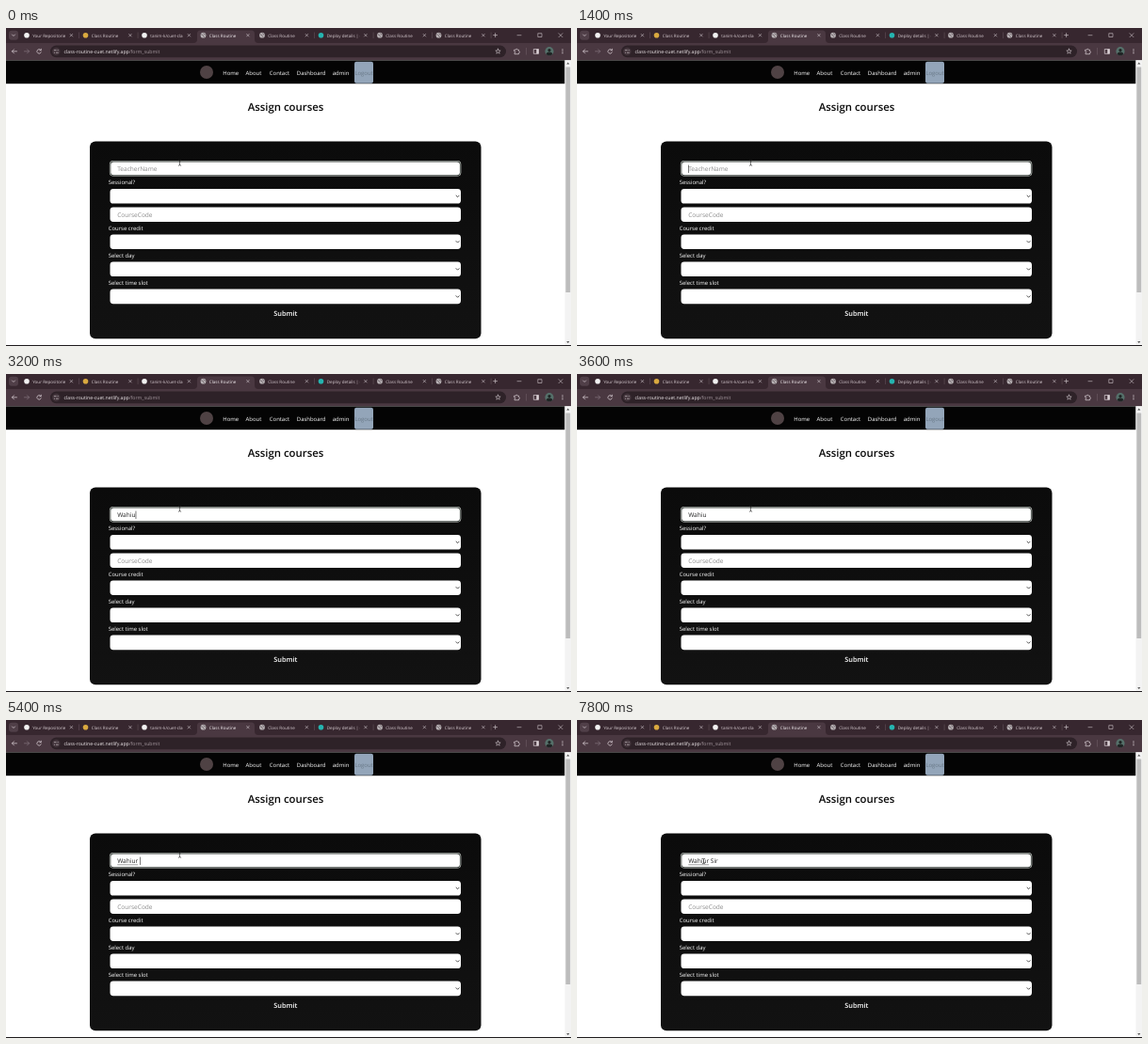
These frames come from a looping animation (600 by 338 pixels, 8 s). An HTML page:

```html
<!DOCTYPE html>
<html lang="en">
<head>
<meta charset="utf-8">
<title>Assign courses</title>
<style>
  html, body { margin: 0; width: 100%; height: 100%; overflow: hidden; background: #fff; }
  svg { display: block; width: 100vw; height: 100vh; }
  text { font-family: "Open Sans", "Noto Sans", sans-serif; white-space: pre; text-rendering: geometricPrecision; }
</style>
</head>
<body>
<svg id="stage" viewBox="0 0 600 338">
  <defs>
    <linearGradient id="panel" x1="0" y1="0" x2="0" y2="1">
      <stop offset="0" stop-color="#0b0b0b"/><stop offset="1" stop-color="#121212"/>
    </linearGradient>
    <clipPath id="face"><circle cx="577" cy="24.7" r="4.6"/></clipPath>
  </defs>
  <g id="browser"></g>
  <g id="page"></g>
  <g id="live"></g>
</svg>
<script>
const NS = 'http://www.w3.org/2000/svg';
const browser = document.getElementById('browser');
const page = document.getElementById('page');
const live = document.getElementById('live');

function el(parent, name, attrs, content) {
  const node = document.createElementNS(NS, name);
  for (const key in attrs) node.setAttribute(key, attrs[key]);
  if (content !== undefined) node.textContent = content;
  parent.appendChild(node);
  return node;
}
const rect = (g, x, y, width, height, fill, rx = 0, more = {}) =>
  el(g, 'rect', { x, y, width, height, fill, rx, ...more });
const dot = (g, cx, cy, r, fill) => el(g, 'circle', { cx, cy, r, fill });
const line = (g, d, stroke, width = 0.7) =>
  el(g, 'path', { d, stroke, 'stroke-width': width, fill: 'none', 'stroke-linecap': 'round', 'stroke-linejoin': 'round' });
const label = (g, x, y, size, fill, str, more = {}) =>
  el(g, 'text', { x, y, 'font-size': size, fill, ...more }, str);

// Browser frame
const STRIP = '#37272f', BAR = '#4a3841', PILL = '#2e2228', ICON = '#ddd3d8';

function globe(x, y) {
  dot(browser, x, y, 2.9, '#b9b3b6');
  line(browser, `M${x - 1.9} ${y - 0.9}q1.5 .2 1.7 1.2t1.2 1.5M${x + 0.3} ${y - 2}q.3 1.3 1.7 1.4`, '#64585e', 0.8);
}

function drawTab(i, title, mark) {
  const x = 22 + i * 62.5;
  const active = i === 3;
  if (active) {
    el(browser, 'path', { d: 'M199 16Q203 16 203 12V6Q203 2.5 206.5 2.5H260.5Q264 2.5 264 6V12Q264 16 268 16Z', fill: BAR });
  } else if (i !== 2) {
    rect(browser, x + 55.3, 4.5, 0.5, 6.5, '#6b5962');
  }
  if (mark) dot(browser, x, 7.7, 2.8, mark);
  else globe(x, 7.7);
  const box = el(browser, 'svg', { x: x + 6, y: 0, width: 35, height: 16 });
  label(box, 0.3, 9.5, 4.55, active ? '#f4eef1' : '#d6cbd0', title);
  const c = x + 47.4;
  line(browser, `M${c - 1.3} 6.4l2.6 2.6m0 -2.6l-2.6 2.6`, ICON, 0.55);
}

function drawBrowser() {
  rect(browser, 0, 0, 600, 17, STRIP);
  rect(browser, 0, 16, 600, 18.3, BAR);
  rect(browser, 3, 2.7, 10, 10, '#503f48', 3);
  line(browser, 'M6.5 7l1.5 1.5L9.5 7', ICON);
  [['Your Repositories', '#f2f2f2'], ['Class Routine', '#d9a93f'], ['tanim-k/cuet-class', '#f2f2f2'],
   ['Class Routine'], ['Class Routine'], ['Deploy details | cuet', '#25b5b0'],
   ['Class Routine'], ['Class Routine']].forEach(([title, mark], i) => drawTab(i, title, mark));
  line(browser, 'M517.6 7.6h4M519.6 5.6v4', ICON, 0.6);
  line(browser, 'M543 7.7h4M565.2 5.7h3.8v3.8h-3.8zM587 5.7l4 4m0 -4l-4 4', ICON, 0.55);

  line(browser, 'M11.5 24.8h-5m2 -2.1l-2.1 2.1l2.1 2.1', ICON);
  line(browser, 'M19.5 24.8h5m-2 -2.1l2.1 2.1l-2.1 2.1', '#85747d');
  line(browser, 'M37 23.4a2.3 2.3 0 1 0 .3 2.4M37.3 22.2v1.6h-1.6', ICON);
  rect(browser, 47, 18.6, 484, 12.6, PILL, 6.3);
  dot(browser, 53.3, 24.9, 4.2, '#44363d');
  line(browser, 'M51.3 23.6h1.8M55 23.6h.3M51.3 26.2h.3M53.4 26.2h1.9', ICON, 0.6);
  const url = label(browser, 61.5, 26.7, 5.16, '#f0eaed', '');
  el(url, 'tspan', {}, 'class-routine-cuet.netlify.app');
  el(url, 'tspan', { fill: '#a5989f' }, '/form_submit');

  let star = '';
  for (let k = 0; k < 10; k++) {
    const a = k * Math.PI / 5, r = k % 2 ? 1.2 : 2.8;
    star += `${k ? 'L' : 'M'}${522.5 + r * Math.sin(a)} ${24.9 - r * Math.cos(a)}`;
  }
  line(browser, star + 'Z', ICON, 0.55);
  line(browser, 'M540 23.2h1.4a.9 .9 0 0 1 1.8 0h1.4v1.5a.9 .9 0 0 1 0 1.8v1.2h-4.6v-1.4a.8 .8 0 0 0 0 -1.6z', ICON);
  rect(browser, 552.3, 21, 0.5, 7.5, '#75636c');
  line(browser, 'M560.7 22.5h4.8v4.8h-4.8z', ICON);
  rect(browser, 563.3, 22.5, 2.2, 4.8, ICON);
  dot(browser, 577, 24.7, 4.6, '#55706a');
  const face = el(browser, 'g', { 'clip-path': 'url(#face)' });
  dot(face, 577, 23.6, 1.6, '#1f2424');
  el(face, 'ellipse', { cx: 577, cy: 29, rx: 3.5, ry: 3.4, fill: '#1f2424' });
  [-1.9, 0, 1.9].forEach(d => dot(browser, 591, 24.8 + d, 0.6, ICON));
}

// Web page
function field(y, select) {
  rect(page, 110.5, y, 372.5, 15.6, '#fff', 3.4);
  if (select) line(page, `M478 ${y + 7.1}l1.6 1.6l1.6 -1.6`, '#222', 0.8);
}

function drawPage() {
  rect(page, 0, 34.3, 593.5, 303.7, '#fff');
  rect(page, 0, 34.3, 593.5, 24.9, '#040404');
  dot(page, 213, 47, 7, '#4f4244');
  [[230.3, 'Home'], [254.6, 'About'], [279.8, 'Contact'], [308.8, 'Dashboard'], [346.8, 'admin']]
    .forEach(([x, str]) => label(page, x, 49.6, 5.95, '#fff', str));
  rect(page, 370, 35.8, 20, 23, '#93a5b9', 2);
  label(page, 370.4, 49.6, 5.95, '#687887', 'Logout');

  label(page, 297, 88.3, 11.4, '#0a0a0a', 'Assign courses', { 'font-weight': 600, 'text-anchor': 'middle' });
  rect(page, 89, 120.5, 415.5, 209.7, 'url(#panel)', 6);

  rect(page, 109.9, 141, 373.4, 16.6, '#c9cdc9', 4);
  rect(page, 110.5, 141.6, 372.2, 15.4, '#3c423e', 3.6);
  rect(page, 111.3, 142.4, 370.6, 13.8, '#fff', 3);
  field(171, true);
  field(190.4, false);
  [219.4, 248.5, 277.6].forEach(y => field(y, true));
  [[166.2, 'Sessional?'], [215, 'Course credit'], [244.1, 'Select day'], [273.1, 'Select time slot']]
    .forEach(([y, str]) => label(page, 108.7, y, 5.95, '#fff', str));
  label(page, 118.2, 200.7, 6.55, '#8b8b8b', 'CourseCode');
  label(page, 296.8, 306.2, 7.3, '#fff', 'Submit', { 'font-weight': 600, 'text-anchor': 'middle' });

  rect(page, 593.5, 34.3, 6.5, 303.7, '#f3f3f3');
  rect(page, 594.4, 41.5, 4.8, 239.5, '#bdbdbd');
  el(page, 'path', { d: 'M595.2 38.6l1.6 -2l1.6 2zM595.2 333l1.6 2l1.6 -2z', fill: '#555' });
  rect(page, 0, 337, 600, 1, '#1d1a1c');
}

drawBrowser();
drawPage();

// Moving parts
const LOOP = 8000, STEP = 200, LEFT = 118.2;
const NAME = 'Wahiur', FULL = NAME + ' Sir';
const typed = label(live, LEFT, 152.3, 6.55, '#222', '');
const wave = rect(live, LEFT, 153.6, 0, 0.6, '#555');
const caret = rect(live, 0, 145.6, 0.6, 8.4, '#222');
const mouse = line(live, 'M-1.2 -2.7q1.2 0 1.2 .6q0 -.6 1.2 -.6M0 -2.1v4.2M-1.2 2.7q1.2 0 1.2 -.6q0 .6 1.2 .6', '#333', 0.65);

// [time, letters typed, caret visible]
const typing = [
  [0, 0, 0], [400, 0, 1], [1000, 0, 0], [1400, 0, 1], [2000, 0, 0],
  [2200, 1, 1], [2400, 2, 1], [2600, 3, 1], [2800, 4, 1], [3200, 5, 1],
  [3600, 5, 0], [4200, 5, 1], [4600, 6, 1], [5200, 6, 0], [5400, 7, 1],
  [5800, 8, 1], [6000, 9, 1], [6200, 10, 1], [6800, 10, 0], [7200, 10, 1], [7800, 10, 0]
];
// [time, x, y]
const moves = [
  [0, 184.5, 143.5], [6800, 180, 160], [7000, 172, 165.5], [7200, 160, 164.5],
  [7400, 147, 159], [7600, 137.5, 152], [7800, 134.5, 150]
];
const last = (list, t) => list.filter(item => item[0] <= t).pop();

function draw(time) {
  const t = Math.floor((time % LOOP) / STEP) * STEP;
  const [, count, shown] = last(typing, t);
  typed.textContent = count ? FULL.slice(0, count) : 'TeacherName';
  typed.setAttribute('fill', count ? '#222' : '#8b8b8b');
  const end = count ? typed.getSubStringLength(0, count) : 0;
  caret.setAttribute('x', LEFT + end + 0.2);
  caret.setAttribute('opacity', shown);
  wave.setAttribute('width', count > NAME.length ? typed.getSubStringLength(0, NAME.length) : 0);
  const [, x, y] = last(moves, t);
  mouse.setAttribute('transform', `translate(${x} ${y})`);
}

const start = performance.now();
function tick() {
  draw(performance.now() - start);
  requestAnimationFrame(tick);
}
tick();
</script>
</body>
</html>
```
